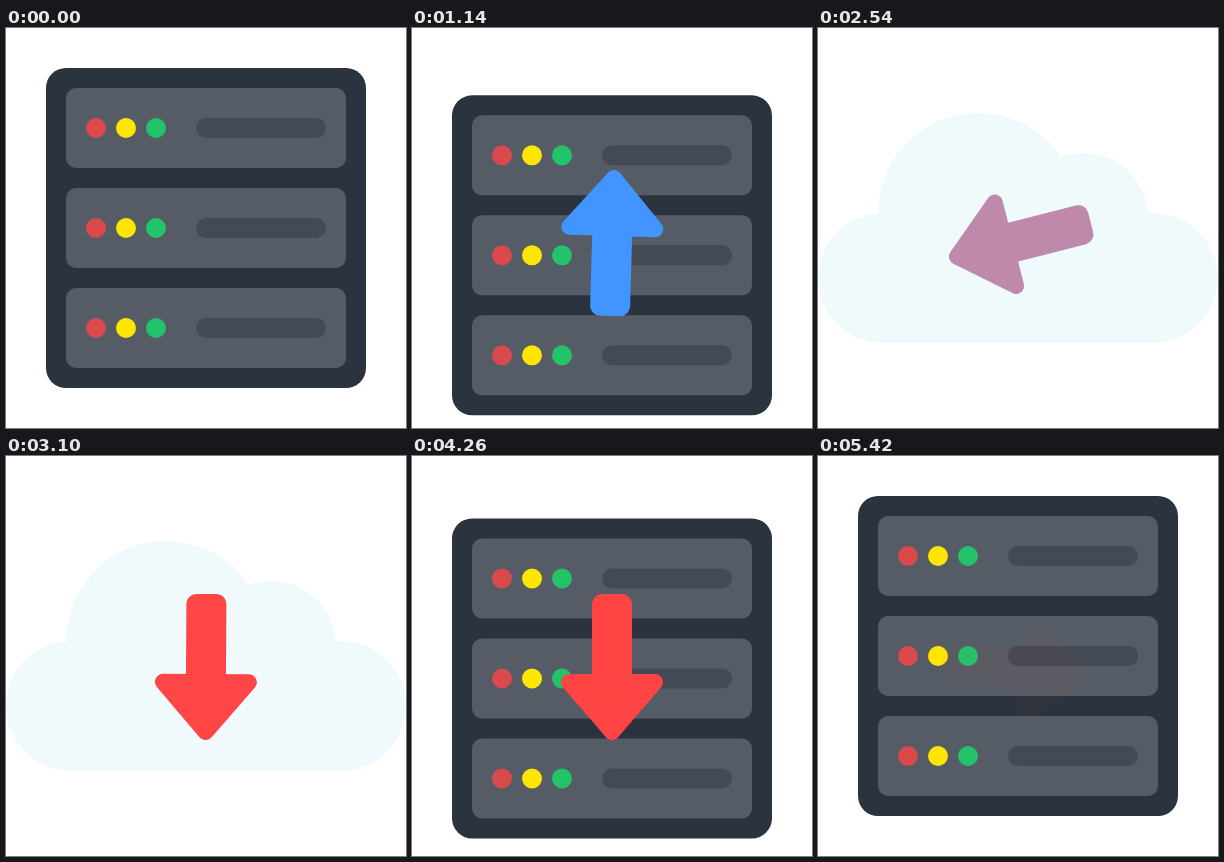
Write an HTML page that moves like this. It is 400 px wide and 400 px high and loops after 6000 ms.

```html
<!DOCTYPE html>
<html lang="en">
<head>
<meta charset="utf-8">
<title>Server and cloud transfer</title>
<style>
  html, body { margin: 0; width: 100%; height: 100%; overflow: hidden; background: #fff; }
  svg { display: block; width: 100%; height: 100%; }
</style>
</head>
<body>
<svg viewBox="0 0 400 400">
  <defs>
    <g id="unit">
      <rect x="60" y="60" width="280" height="80" rx="10" fill="#555c65"/>
      <circle cx="90" cy="100" r="10" fill="#da4a4d"/>
      <circle cx="120" cy="100" r="10" fill="#ffe600"/>
      <circle cx="150" cy="100" r="10" fill="#23c36a"/>
      <rect x="190" y="90" width="130" height="20" rx="10" fill="#444a54"/>
    </g>
    <g id="arrow">
      <path d="M200 150L243 200H157Z" stroke-width="16" stroke-linejoin="round"/>
      <rect x="180" y="190" width="40" height="98" rx="10" stroke="none"/>
    </g>
  </defs>
  <g id="cloud" fill="#f0fafd">
    <circle cx="65" cy="250" r="65"/>
    <circle cx="335" cy="250" r="65"/>
    <circle cx="160" cy="185" r="100"/>
    <circle cx="265" cy="190" r="65"/>
    <rect x="65" y="185" width="270" height="130"/>
  </g>
  <g id="server">
    <rect x="40" y="40" width="320" height="320" rx="20" fill="#2b343e"/>
    <use href="#unit"/>
    <use href="#unit" y="100"/>
    <use href="#unit" y="200"/>
  </g>
  <g id="spin">
    <g id="up" fill="#4294ff" stroke="#4294ff"><use href="#arrow"/></g>
    <g id="down" fill="#ff4444" stroke="#ff4444"><use href="#arrow"/></g>
  </g>
</svg>
<script>
  const LOOP = 6000;
  const SLIDE = 845;      // length of one slide in or out
  const SHIFT = 100;      // how far a slide travels
  const TO_CLOUD = 1299;  // hard swaps between the two scenes
  const TO_SERVER = 4079;

  const [cloud, server, spin, up, down] =
    ['cloud', 'server', 'spin', 'up', 'down'].map(id => document.getElementById(id));

  const span = (t, start, length) => Math.min(1, Math.max(0, (t - start) / length));
  const quadOut = x => 1 - (1 - x) ** 2;
  const cubicOut = x => 1 - (1 - x) ** 3;
  const expoIn = x => x > 0 ? 2 ** (10 * x - 10) : 0;
  const expoOut = x => 1 - expoIn(1 - x);

  const slideOut = (t, end) => SHIFT * expoIn(span(t, end - SLIDE, SLIDE));
  const slideIn = (t, start) => SHIFT * (1 - expoOut(span(t, start, SLIDE)));

  function place(el, visible, y) {
    el.setAttribute('visibility', visible ? 'visible' : 'hidden');
    el.setAttribute('transform', `translate(0 ${y})`);
  }

  function draw(t) {
    const inCloud = t >= TO_CLOUD && t < TO_SERVER;
    place(server, !inCloud, t < TO_CLOUD ? slideOut(t, TO_CLOUD) : slideIn(t, TO_SERVER));
    place(cloud, inCloud, -slideIn(t, TO_CLOUD) - slideOut(t, TO_SERVER));

    const enter = cubicOut(span(t, 510, 860));
    const flip = span(t, 2315, 900);
    const leave = cubicOut(span(t, 4890, 880));
    const angle = 90 * (1 - enter) - 180 * cubicOut(flip) - 90 * leave;
    spin.setAttribute('transform', `rotate(${angle} 200 213)`);

    const swap = quadOut(flip);
    up.setAttribute('opacity', quadOut(span(t, 520, 430)) * (1 - swap));
    down.setAttribute('opacity', swap * (1 - quadOut(span(t, 4890, 640))));
  }

  const begin = performance.now();
  function tick() {
    draw((performance.now() - begin) % LOOP);
    requestAnimationFrame(tick);
  }
  tick();
</script>
</body>
</html>
```
